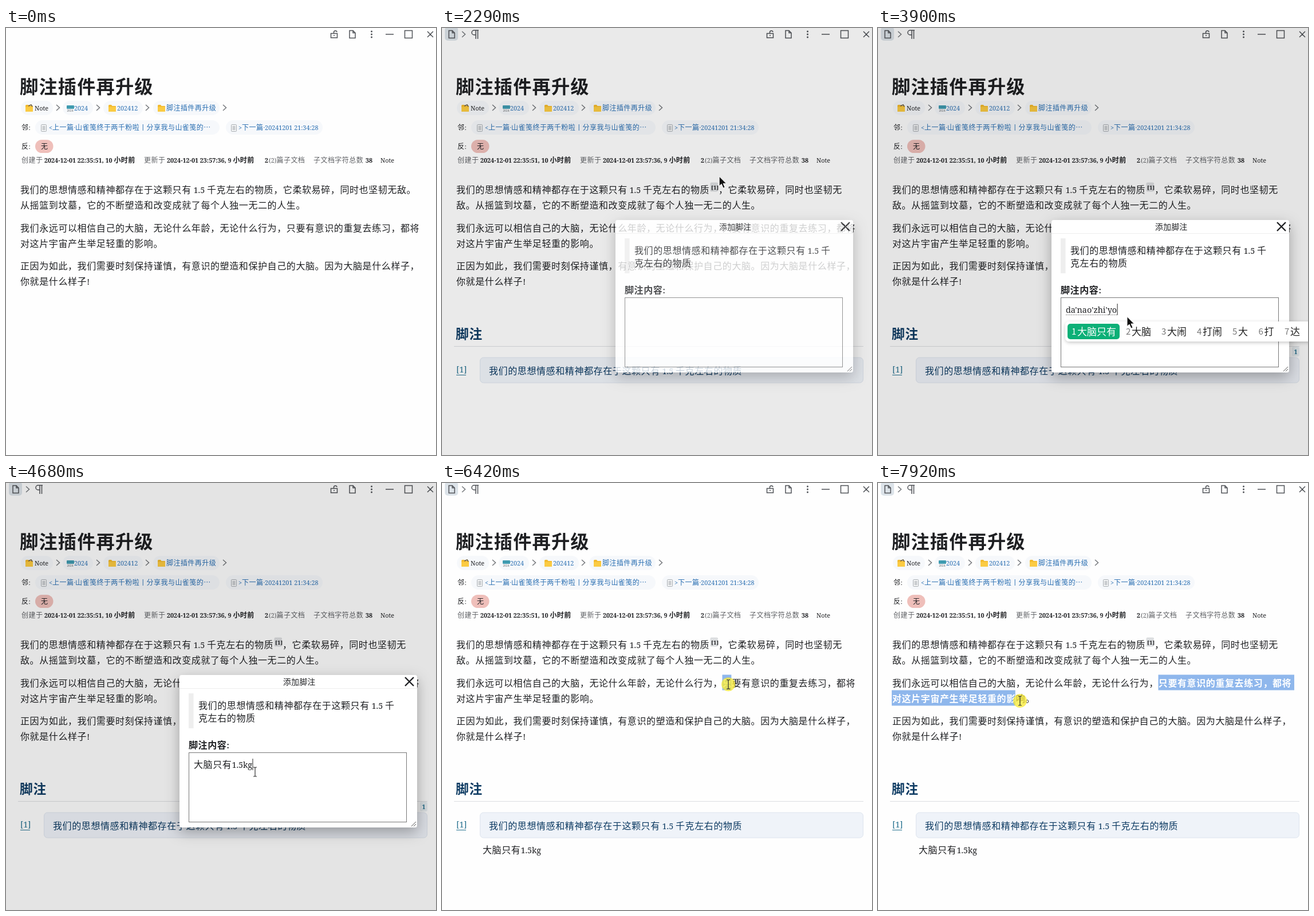
An HTML page for the animation above (7990 ms loop, 751 px wide and 745 px high).

```html
<!DOCTYPE html>
<html lang="zh-CN">
<head>
<meta charset="utf-8">
<style>
html, body { margin: 0; width: 100%; height: 100%; overflow: hidden; background: #fefefe; }
svg { display: block; width: 751px; height: 745px; }
text { font-family: 'Noto Serif', 'Noto Sans CJK SC', 'Noto Sans CJK', sans-serif; font-weight: 500; letter-spacing: .0375em; fill: #1f2023; }
.l { font-size: .9em; letter-spacing: 0; }
.b { font-weight: 700; }
.link { fill: #2a6fb2; }
.dim { fill: #5f6165; }
.navy { fill: #0c3a62; }
.white text { fill: #fff; font-weight: 700; }
.ime text { font-family: 'Noto Sans CJK SC', 'Noto Sans CJK', sans-serif; font-weight: 400; letter-spacing: 0; }
.line { fill: none; stroke: #505358; stroke-width: 1.5; }
</style>
</head>
<body>
<svg id="stage" viewBox="0 0 751 745" xmlns="http://www.w3.org/2000/svg"></svg>
<script>
const LOOP = 7990, PITCH = 16.6, LEFT = 24;
const stage = document.getElementById('stage');
const $ = id => document.getElementById(id);

// Latin runs are set slightly smaller than the Chinese characters around them.
const mix = s => s.replace(/[ -~·]+/g, run =>
  `<tspan class="l">${run.replace(/&/g, '&amp;').replace(/</g, '&lt;')}</tspan>`);
const text = (x, mid, s, size = 16, attrs = '') =>
  `<text x="${x}" y="${mid + size * .37}" font-size="${size}" ${attrs}>${mix(s)}</text>`;
const rect = (x, y, w, h, fill, r = 0, attrs = '') =>
  `<rect x="${x}" y="${y}" width="${w}" height="${h}" rx="${r}" fill="${fill}" ${attrs}/>`;
const path = (d, attrs = '') => `<path class="line" d="${d}" ${attrs}/>`;
const at = (x, y, body, attrs = '') => `<g transform="translate(${x} ${y})" ${attrs}>${body}</g>`;
const group = (id, body, attrs = '') => `<g id="${id}" ${attrs}>${body}</g>`;

const quote = '我们的思想情感和精神都存在于这颗只有 1.5 千克左右的物质';
const second = ['我们永远可以相信自己的大脑，无论什么年龄，无论什么行为，只要有意识的重复去练习，都将', '对这片宇宙产生举足轻重的影响。'];
const third = ['正因为如此，我们需要时刻保持谨慎，有意识的塑造和保护自己的大脑。因为大脑是什么样子，', '你就是什么样子!'];
const lines = (list, mid) => list.map((s, i) => text(25, mid + i * 27, s)).join('');

const chevron = (x, y) => path(`M${x - 3} ${y - 5}l5.5 5l-5.5 5`, 'style="stroke:#75787c"');
const chip = (x, y, w, h = 25) => rect(x, y, w, h, '#f6f8fb', h / 2);
const folder = (x, y) => at(x, y, '<path d="M0 1.5q0-1.5 1.5-1.5h3.5l1.5 2h5.5q1 0 1 1v8q0 1-1 1h-11q-1 0-1-1z" fill="#f2b92d"/>' + rect(0, 3.5, 13, 8.5, '#fbcb43', 1));
const sheet = (x, y) => at(x, y, rect(.5, .5, 9, 12, '#f4f5f6', 1, 'stroke="#a9aeb3"') + path('M2.5 4h5M2.5 6.5h5M2.5 9h5', 'style="stroke:#8d9399;stroke-width:1"'));
const docIcon = (x, y) => at(x, y, path('M-5-6.5h6l4 4v9h-10zM1-6.5v4h4'));
const pilcrow = (x, y, color = '#505358') => at(x, y, path('M6-7H-2a4 4 0 0 0 0 8H1M1-7V8M4.5-7V8', `style="stroke:${color}"`));

const windowBar = at(573, 11, path('M-5.5-1.5h11v7.5h-11zM-.5-1.500V-4a2.800 2.800 0 0 1 5.500 0M-1 2h2'))
  + docIcon(605, 11)
  + [6, 11, 16].map(y => `<circle cx="638.500" cy="${y}" r="1.5" fill="#505358"/>`).join('')
  + path('M663 11h14M696.5 4.500h13v13h-13zM736 6l10 10M746 6l-10 10');

const header = text(24, 102, '脚注插件再升级', 32.2, 'class="b"')
  + chip(26, 127, 56) + folder(34, 134) + path('M39 136l5-2l2 3', 'style="stroke:#6a5a3a"') + text(50, 140, 'Note', 12)
  + chip(99, 127, 53) + rect(106, 135, 13, 6, '#3f9bb0', 1) + text(106.5, 143.5, '2024', 5.5, 'class="dim"') + text(119, 140, '2024', 12, 'class="link"')
  + chip(170, 127, 69) + folder(179, 134) + text(194, 140, '202412', 12, 'class="link"')
  + chip(257, 127, 116) + folder(265, 134) + text(280, 140, '脚注插件再升级', 12, 'class="link"')
  + [91, 161, 247, 382].map(x => chevron(x, 139)).join('')
  + text(27, 174, '邻:', 12) + chip(51, 161, 322) + sheet(61, 168)
  + text(75, 174, '<上一篇·山雀笺终于两千粉啦丨分享我与山雀笺的⋯', 12, 'class="link"')
  + chip(384, 161, 169) + sheet(393, 168) + text(406, 174, '>下一篇·20241201 21:34:28', 12, 'class="link"')
  + text(27, 207, '反:', 12) + rect(51, 195, 31.5, 23, '#efbfba', 11.5) + text(61, 207, '无', 12)
  + text(27, 230.5, '创建于', 12, 'class="dim"') + text(67, 230.5, '2024-12-01 22:35:51, 10 小时前', 12, 'class="b"')
  + text(241, 230.5, '更新于', 12, 'class="dim"') + text(281, 230.5, '2024-12-01 23:57:36, 9 小时前', 12, 'class="b"')
  + text(452, 230.5, '2', 12, 'class="b"') + text(459, 230.5, '(2)篇子文档', 12, 'class="dim"')
  + text(537, 230.5, '子文档字符总数', 12, 'class="dim"') + text(628, 230.5, '38', 12, 'class="b"') + text(654, 230.5, 'Note', 12);

const before = lines([quote + '，它柔软易碎，同时也坚韧无敌。', '从摇篮到坟墓，它的不断塑造和改变成就了每个人独一无二的人生。'], 282.5);
const after = text(25, 282.5, quote) + rect(468.5, 269.5, 13.5, 16, '#dcdee0', 2) + text(470, 278, '[1]', 10.5, 'class="b"')
  + text(483, 282.5, '，它柔软易碎，同时也坚韧无')
  + text(25, 309.5, '敌。从摇篮到坟墓，它的不断塑造和改变成就了每个人独一无二的人生。');

const footnote = text(24, 534, '脚注', 22.6, 'class="b navy"') + path('M21 555.5H736', 'style="stroke:#dcdee1;stroke-width:1"')
  + text(25, 595.5, '[1]', 16, 'style="fill:#24708f"') + path('M25 605.5h17', 'style="stroke:#24708f;stroke-width:1"')
  + rect(66.5, 575, 669, 44, '#eff3f9', 6, 'stroke="#dde4ee"') + text(82, 598, quote, 16, 'class="navy"');
const badge = rect(723, 556, 13, 17, '#e9eef2', 3) + text(726.500, 564.5, '1', 12, 'class="b" style="fill:#24708f"');

const glyph = (x, s, style = '') => `<text x="${x}" y="256" text-anchor="middle" style="font:700 18px 'Open Sans',sans-serif;fill:#484b50;letter-spacing:0;${style}">${s}</text>`;
const toolbar = rect(-20, 235, 520, 32, '#ebeff3', 6, 'filter="url(#soft)"') + rect(472, 238, 27, 25, '#dde5ea', 5)
  + path('M1 254l4-5l4 4l7-8M1 246l3 3', '')
  + path('M34 246h-2a4 4 0 0 0 0 8h2M38 246h2a4 4 0 0 1 0 8h-2M33 250h6')
  + glyph(72, 'A', 'font-size:14px;font-weight:400') + path('M65 256.500h14')
  + glyph(98, 'B', 'font-size:19px') + glyph(125, 'I', 'font-style:italic;font-family:"Noto Serif",serif') + glyph(152, 'U', 'font-size:15px;font-weight:400') + path('M146 257.5h13')
  + path('M172 250.500h15M174 245h12M180 245v3M180 253v5', 'style="stroke-width:2.200"')
  + path('M202 248h9l-2 4v5h-5v-5zM206.500 242v3M200 244l2 2M213 244l-2 2')
  + glyph(231, 'X', 'font-weight:400;font-size:16px') + glyph(238, '2', 'font-size:9px;baseline-shift:6px')
  + glyph(258, 'X', 'font-weight:400;font-size:16px') + glyph(266, '2', 'font-size:9px;baseline-shift:-2px')
  + path('M282 244h12M288 244l-3 12M281 243l13 13')
  + path('M320 246l-4 4l4 4M326 246l4 4l-4 4')
  + path('M343.500 245h14v10h-14zM346 248h9M346 250.500h9M347 253h7')
  + path('M371 244h6l7 7l-6 6l-7-7zM375 249l3 3l3-3')
  + glyph(404, 'Σ') + '<circle class="line" cx="431" cy="250" r="7" style="stroke-width:1"/>' + glyph(431, 'M', 'font-size:9px;font-weight:400;baseline-shift:3px')
  + path('M452 244h10v4h-10zM462 246h3v5h-7v6', 'style="stroke-width:2"')
  + glyph(485.5, '[1]', 'font-size:13px;fill:#2b8498;baseline-shift:2px');
const tooltip = rect(453, 205, 65.5, 26, '#87979f', 6, 'filter="url(#soft)"') + text(461, 218, '添加脚注', 11.800, 'style="fill:#fff"');

const dialog = rect(303, 335, 415, 266, '#fff', 4, 'filter="url(#deep)"')
  + text(484, 347, '添加脚注', 13.7) + path('M697 339l15 15M712 339l-15 15', 'style="stroke:#202124;stroke-width:2.400"')
  + path('M303 358.500H718', 'style="stroke:#eee;stroke-width:1"') + rect(319, 367, 8.5, 61, '#eeeeee')
  + text(336, 388, quote.slice(0, -6)) + text(336, 410.500, quote.slice(-6))
  + text(319, 457, '脚注内容:', 16, 'class="b"')
  + rect(319.5, 470.5, 380, 121, '#fff', 0, 'stroke="#777"') + path('M708 599l8-8M712 599l4-4', 'style="stroke:#555;stroke-width:1"')
  + '<text id="typed" x="328" y="497" font-size="16"></text>'
  + path('', 'id="preline" style="stroke:#888;stroke-width:1" stroke-dasharray="2 1"') + path('', 'id="caret" style="stroke:#222;stroke-width:1"');

const cursors = group('arrow', '<path d="M0 0V17l4-3.500l3 7l3-1.300l-3-6.700h5.500z" fill="#111" stroke="#fff"/>')
  + group('beam', path('M-3-8h2l1 1l1-1h2M-3 8h2l1-1l1 1h2M0-7V7', 'style="stroke:#333;stroke-width:1.200"'))
  + group('hand', '<path d="M-2 0q2-2 3 0v7l7 2q2 1 1.500 4l-1 7h-9l-5-8q0-2 2-1.500l1.500 2z" fill="#fff" stroke="#222" stroke-width="1.2"/>');

stage.innerHTML = `<defs>
  <filter id="soft" x="-20%" y="-50%" width="140%" height="220%"><feDropShadow dx="0" dy="2" stdDeviation="3" flood-opacity=".22"/></filter>
  <filter id="deep" x="-20%" y="-20%" width="140%" height="150%"><feDropShadow dx="0" dy="8" stdDeviation="12" flood-opacity=".3"/></filter>
  <clipPath id="picked"><rect id="pickA"/><rect id="pickB"/></clipPath></defs>`
  + rect(0, 0, 751, 745, '#fefefe') + windowBar
  + group('crumb', rect(5, -2, 23, 24, '#dce3e9', 5) + docIcon(17, 11) + chevron(38, 11) + pilcrow(58, 11))
  + header + group('before', before) + group('after', after)
  + lines(second, 349) + lines(third, 415.5)
  + group('footnote', footnote) + group('answer', text(71, 640.5, '大脑只有1.5kg')) + group('badge', badge)
  + group('gutter', pilcrow(8, 0, '#85888c'))
  + `<g clip-path="url(#picked)" class="white">${rect(0, 260, 751, 140, '#8fb7ec')}${text(25, 282.5, quote)}${lines(second, 349)}</g>`
  + group('toolbar', toolbar) + group('tooltip', tooltip)
  + group('modal', rect(0, 0, 751, 745, '#000', 0, 'opacity=".1"') + dialog)
  + group('ime', '', 'class="ime"')
  + group('pointer', '<circle id="press" r="12" fill="#f8ea30" opacity=".75"/>' + cursors);

// time, committed text, letters being composed, candidates, popup x
const d = '的都到对大等但多', da = '大 打 答 哒 达 搭 对啊 独爱';
const brain = '大脑 大闹 打闹 大 打 达 答 搭', whole = '大脑只有 大脑 大闹 打闹 大 打 达 答';
const typing = [
  [0, '', ''], [3100, '', 'd', [...d].join(' ')], [3180, '', 'da', da],
  [3400, '', "da'n", brain], [3470, '', "da'na", brain], [3540, '', "da'nao", brain],
  [3620, '', "da'nao'z", whole], [3690, '', "da'nao'zh", whole], [3760, '', "da'nao'zhi", whole],
  [3830, '', "da'nao'zhi'y", whole], [3900, '', "da'nao'zhi'yo", whole], [3970, '', "da'nao'zhi'you", whole],
  [4050, '大脑只有', ''], [4190, '大脑只有1', ''], [4300, '大脑只有1.', ''], [4370, '大脑只有1.5', ''],
  [4450, '大脑只有1.5', 'k', '看 可 快 开 块 口 靠 课', 411], [4530, '大脑只有1.5', 'kg', '可估 看过 可观 客观 开关 开工 考过 苦瓜', 411],
  [4620, '大脑只有1.5kg', '']
];

// time, x, y
const route = [[70, 490, 688], [340, 471, 284], [410, 469, 283], [800, 20, 281], [900, 24, 274], [1480, 484, 257],
  [2200, 484, 257], [2570, 485, 269], [2900, 435, 503], [4720, 435, 504], [5030, 640, 396], [5140, 702, 346], [5480, 702, 346], [5860, 496, 350],
  [6050, 490, 350], [6650, 505, 352], [6780, 480, 367], [7160, 199, 380], [7510, 241, 380], [7920, 248, 380]];

const between = (t, a, b) => t >= a && t < b;
const show = (id, on) => { $(id).style.display = on ? '' : 'none'; };
const ramp = (t, a, b) => Math.min(1, Math.max(0, (t - a) / (b - a)));

function place(t) {
  const i = route.findIndex(k => k[0] > t);
  if (i < 1) return route[i ? route.length - 1 : 0].slice(1);
  const [t0, x0, y0] = route[i - 1], [t1, x1, y1] = route[i];
  const p = ramp(t, t0, t1), e = p * p * (3 - 2 * p);
  return [x0 + (x1 - x0) * e, y0 + (y1 - y0) * e];
}

function band(id, x = 0, y = 0, right = 0, h = 27) {
  for (const [k, v] of Object.entries({ x, y, width: Math.max(0, right - x), height: h })) $(id).setAttribute(k, v);
}

function select(t, x, y) {
  const edge = LEFT + Math.max(0, Math.round((x - 25) / PITCH)) * PITCH;
  band('pickA'); band('pickB');
  if (between(t, 410, 1800)) band('pickA', t < 800 ? Math.min(edge, 468) : LEFT, 268, 468);
  if (t >= 6050) {
    const lower = y > 362;
    band('pickA', 489.5, 334.5, lower ? 727 : edge);
    if (lower) band('pickB', LEFT, 361.5, edge);
  }
}

let shown;
function compose(t) {
  const step = typing.findLast(s => s[0] <= t);
  if (step === shown) return;
  shown = step;
  const [, done, pre, list, x = 328] = step;
  $('typed').innerHTML = mix(done + pre);
  const end = 329 + (done + pre ? $('typed').getComputedTextLength() : 0);
  $('caret').setAttribute('d', `M${end} 481v20`);
  $('preline').setAttribute('d', pre ? `M${x} 500.5H${end}` : '');
  if (!list) { $('ime').innerHTML = ''; return; }
  let pos = x + 10;
  const words = list.split(' ').map((word, i) => {
    const fill = i ? '#222' : '#fff';
    const start = pos, width = word.length * 16.500;
    pos += width + 29;
    return (i ? '' : rect(start - 7, 516, width + 25, 27, '#0cb077', 5))
      + `<text x="${start}" y="535" font-size="15" style="fill:${i ? '#777' : fill}">${i + 1}</text>`
      + `<text x="${start + 10}" y="536" font-size="17" style="fill:${fill}">${word}</text>`;
  });
  $('ime').innerHTML = rect(x - 1, 512, 620, 35, '#fff', 7, 'filter="url(#soft)"') + words.join('');
}

function render(t) {
  const [x, y] = place(t);
  show('crumb', t >= 920);
  show('before', t < 2000);
  show('after', t >= 2000);
  show('footnote', t >= 2000);
  show('answer', t >= 5640);
  show('badge', between(t, 3800, 5720));
  show('gutter', between(t, 300, 1850) || between(t, 5340, 6050));
  $('gutter').setAttribute('transform', `translate(0 ${t < 2000 ? 282 : t < 5720 ? 291 : 357})`);
  show('toolbar', between(t, 960, 1800));
  show('tooltip', between(t, 1480, 1800));
  const open = ramp(t, 2150, 2330) * (1 - ramp(t, 5230, 5360));
  $('modal').style.opacity = open;
  show('modal', open > 0);
  show('ime', open > 0);
  show('caret', t >= 2500);
  compose(t);
  select(t, x, y);
  const kind = between(t, 1000, 1850) ? 'hand'
    : t < 280 || between(t, 860, 1000) || between(t, 1850, 4050) || between(t, 4800, 5300) ? 'arrow' : 'beam';
  for (const id of ['arrow', 'beam', 'hand']) show(id, id === kind);
  show('press', between(t, 410, 850) || between(t, 1700, 1790) || between(t, 2930, 3020) || between(t, 5150, 5230) || t >= 6050);
  show('pointer', t >= 70);
  $('pointer').setAttribute('transform', `translate(${x} ${y})`);
}

const begin = performance.now();
function tick() {
  render((performance.now() - begin) % LOOP);
  requestAnimationFrame(tick);
}
tick();
</script>
</body>
</html>
```
